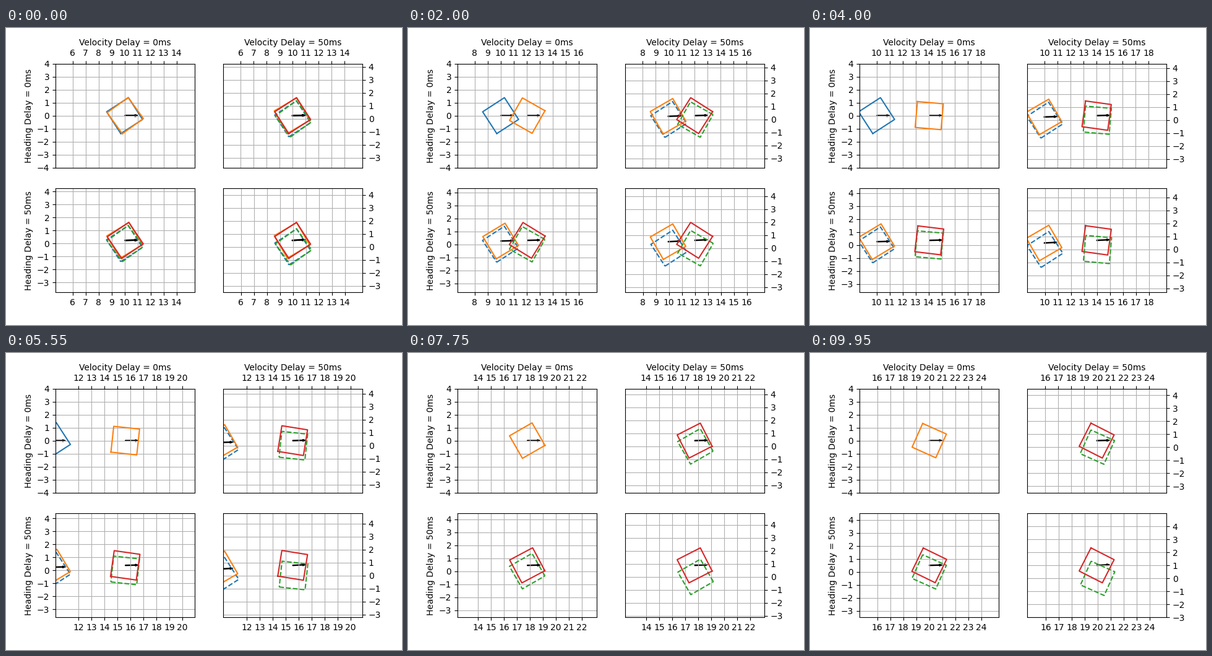
Animation, 640 px wide and 480 px high, one loop 10000 ms. Source, as a matplotlib script:

```python
import matplotlib.pyplot as plt
import numpy as np
from matplotlib.animation import FuncAnimation

FRAMES, STEP = 200, 0.05
START = 10.0
CORNERS = np.array([[1, 1], [-1, 1], [-1, -1], [1, -1], [1, 1]]).T


def square(x, y, angle):
    """Outline of a 2 x 2 square turned about its centre."""
    c, s = np.cos(angle), np.sin(angle)
    px, py = np.array([[c, -s], [s, c]]) @ CORNERS
    return x + px, y + py


class Panel:
    """One robot driving along x while spinning at 1 rad/s."""

    def __init__(self, ax, drift, lag, turn_lag):
        self.ax, self.drift, self.lag, self.turn_lag = ax, drift, lag, turn_lag
        self.delayed = drift > 0
        box = ax.get_position()
        self.half = 4 * (box.width * 640) / (box.height * 480)
        self.middle = None

        if self.delayed:
            ax.plot(*square(START, 0, START), "--", color="C0")
        ax.plot(*square(*self.pose(START)), color="C1" if self.delayed else "C0")
        if self.delayed:
            self.goal, = ax.plot([], [], "--", color="C2")
        self.body, = ax.plot([], [], color="C3" if self.delayed else "C1")

        self.add_arrow(START)
        self.arrow = self.add_arrow(START)
        ax.set_yticks(range(-4, 5))
        ax.grid(True)

    def pose(self, t):
        x = (t - self.lag) * np.cos(self.drift)
        return x, self.drift * t, t - self.turn_lag

    def add_arrow(self, t):
        x, y, _ = self.pose(t)
        return self.ax.arrow(x, y, np.cos(self.drift), np.sin(self.drift),
                             width=0.05, length_includes_head=True, color="black")

    def draw(self, t):
        x, y, angle = self.pose(t)
        if self.delayed:
            self.goal.set_data(*square(t, 0, t))
        self.body.set_data(*square(x, y, angle))
        self.arrow.set_data(x=x, y=y)

        middle = round(x)
        if middle != self.middle:
            self.ax.set_xticks(range(middle - 4, middle + 5))
            self.middle = middle
        self.ax.set_xlim(x - self.half, x + self.half)
        self.ax.set_ylim(y - 4, y + 4)


fig, axes = plt.subplots(2, 2, figsize=(6.4, 4.8), dpi=100)

for ax, delay in zip(axes[0], (0, 50)):
    ax.xaxis.tick_top()
    ax.xaxis.set_label_position("top")
    ax.set_xlabel(f"Velocity Delay = {delay}ms")
for ax, delay in zip(axes[:, 0], (0, 50)):
    ax.set_ylabel(f"Heading Delay = {delay}ms")
for ax in axes[:, 1]:
    ax.yaxis.tick_right()

panels = [
    Panel(axes[0, 0], 0, 0, 0),
    Panel(axes[0, 1], 0.025, 0.05, 0.05),
    Panel(axes[1, 0], 0.025, -0.01, 0.033),
    Panel(axes[1, 1], 0.05, 0.05, 0.05),
]


def update(frame):
    t = round(START + STEP * (frame + 1), 2)
    for panel in panels:
        panel.draw(t)


anim = FuncAnimation(fig, update, frames=FRAMES, interval=50, repeat=True)
plt.show()
```
